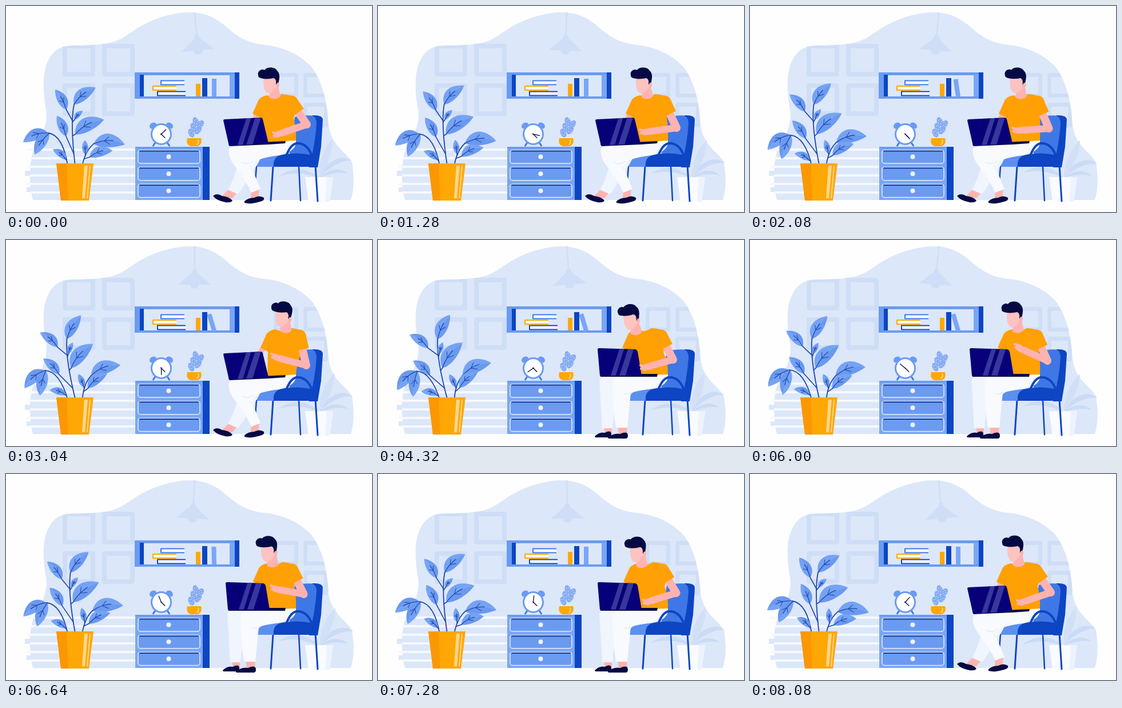
An HTML page with a canvas for the animation above (8.16 s loop, 640 by 360 pixels).

```html
<!DOCTYPE html>
<html lang="en">
<head>
<meta charset="utf-8">
<title>Working from home</title>
<style>
html, body { margin: 0; width: 100%; height: 100%; overflow: hidden; background: #fefefe; }
canvas { display: block; width: 640px; height: 360px; }
</style>
</head>
<body>
<canvas id="stage" width="640" height="360"></canvas>
<script>
const g = document.getElementById('stage').getContext('2d');
const LOOP = 8160, STEP = 80, TAU = Math.PI * 2;
const C = {
  paper: '#fefefe', wall: '#dce7f9', frame: '#cfdef6', faint: '#cbdbf5',
  sky: '#7aa6f5', blue: '#6a9bf1', mid: '#3f78e6', deep: '#0d45c2', ink: '#1e46ad',
  navy: '#060a42', laptop: '#080078', orange: '#ffa704', shirt: '#ffa004', amber: '#fb9703',
  face: '#fcc3c1', skin: '#ffb3b0', pants: '#f8fafe', crease: '#dfe8f8'
};

const fill = (d, color) => { g.fillStyle = color; g.fill(new Path2D(d)); };
const line = (d, color, w = 1.5, cap = 'round') => {
  g.strokeStyle = color; g.lineWidth = w; g.lineCap = cap; g.lineJoin = 'round';
  g.stroke(new Path2D(d));
};
const box = (x, y, w, h, color) => { g.fillStyle = color; g.fillRect(x, y, w, h); };
const oval = (x, y, rx, ry, color, turn = 0) => {
  g.fillStyle = color; g.beginPath(); g.ellipse(x, y, rx, ry, turn, 0, TAU); g.fill();
};
const at = (x, y, turn, draw) => {
  g.save(); g.translate(x, y); g.rotate(turn); draw(); g.restore();
};
const mix = (a, b, k) => a + (b - a) * k;

// Eased 0 to 1 between a and b; pulse rises over a..b and falls over c..d.
const ramp = (t, a, b) => (1 - Math.cos(Math.PI * Math.min(1, Math.max(0, (t - a) / (b - a))))) / 2;
const pulse = (t, a, b, c, d) => ramp(t, a, b) - ramp(t, c, d);
const swing = t => Math.cos(2 * TAU * t / LOOP);

const BLOB = 'M47 339H603C609 320 609 300 605 273C594 254 572 246 565 214C562 190 562 148 537 110' +
  'C516 84 480 70 452 68C420 65 400 50 380 32C356 13 336 11 318 11C290 12 255 22 226 41' +
  'C205 56 190 65 170 66C145 70 125 68 105 70C85 74 76 88 70 105C63 125 66 160 70 180' +
  'C74 205 62 230 50 247C40 270 40 310 47 339Z';

function pictures(x, y, size, rim, gap) {
  g.strokeStyle = C.frame; g.lineWidth = rim;
  for (const dx of [0, gap]) for (const dy of [0, gap])
    g.strokeRect(x + dx + rim / 2, y + dy + rim / 2, size - rim, size - rim);
}

function room() {
  box(0, 0, 640, 360, C.paper);
  fill(BLOB, C.wall);
  g.save();
  g.clip(new Path2D(BLOB));
  pictures(99, 66, 57, 8, 69);
  pictures(468, 117, 43, 7, 52);
  g.restore();
  box(33, 288, 100, 9, C.wall);
  box(36, 317, 100, 8, C.wall);
  for (let i = 0; i < 6; i++) {
    const x = 36 + i % 2 * 6;
    box(x, 249 + 15 * i, 226 - x, 4, '#f5f9ff');
  }
}

function lamp(t) {
  at(330, 11, -swing(t) * 0.088, () => {
    line('M0 0V42', C.frame, 2.5, 'butt');
    oval(0, 67, 8, 7, C.frame);
    fill('M-3 40H3L5 46L29 67H-29L-5 46Z', C.frame);
  });
}

function shelf(t) {
  box(225, 116, 183, 46, C.blue);
  box(241, 121, 150, 37, C.wall);
  box(234, 120, 7, 38, C.deep);
  box(391, 120, 9, 38, C.sky);
  box(400, 116, 8, 46, C.deep);
  [C.mid, C.orange, C.deep].forEach((color, i) => {
    const x = [270, 256, 264][i], y = 129.5 + i * 9.5, end = [312, 298, 314][i];
    box(x, y, end - x, 9, '#fff');
    line(`M${end} ${y + 1}H${x + 1}V${y + 8}H${end}`, color, 2, 'butt');
  });
  box(332, 136, 8, 22, C.orange);
  box(343, 126, 9, 32, C.deep);
  at(368, 158, -0.29 * pulse(t, 1840, 2320, 6240, 6720), () => box(-8, -31, 8, 31, C.sky));
}

function dresser() {
  box(226, 246, 120, 93, C.sky);
  box(226, 246, 130, 3, C.blue);
  box(344, 246, 12, 93, C.deep);
  for (let y = 252; y < 320; y += 29.7) {
    g.beginPath();
    g.roundRect(231, y, 108, 23, 4);
    g.fillStyle = C.blue; g.fill();
    g.strokeStyle = '#e3ecfd'; g.lineWidth = 1.5; g.stroke();
    line(`M234 ${y + 1.5}H336`, '#143a99', 2);
    oval(284.5, y + 11.5, 4, 4, '#f1f5fd');
  }
}

function clock(t) {
  const hand = (turn, size) => at(0, 0, turn, () => line(`M0 1V${-size}`, C.navy, 1.3));
  at(271.5, 224, 0, () => {
    line('M-10 14L-14 20M10 14L14 20', C.mid, 3);
    for (const s of [-1, 1]) oval(s * 14.5, -15, 6.5, 5, C.blue, s * 0.65);
    oval(0, 0, 18.5, 19, C.blue);
    oval(0, 0, 15.5, 16, '#fff');
    hand(2.35, 9);
    hand(TAU * (t / LOOP + 0.125), 11.5);
  });
}

function cactus() {
  for (let i = 0; i < 5; i++) {
    const x = 324 + i % 2 * 10 + i * 2, y = 222 - i * 5;
    oval(x, y, 5, 8, '#86abf3', i % 2 - 0.4);
    for (let a = 0; a < 5; a++)
      oval(x + 3 * Math.cos(a * TAU / 5), y + 4 * Math.sin(a * TAU / 5), 0.8, 0.8, C.wall);
  }
  fill('M317 231H341Q344 242 335 245H323Q314 242 317 231Z', C.orange);
  line('M336 234Q338 239 334 242', '#ffe4ae', 1.5);
}

// Each leaf: place along its stem, angle in degrees, stalk length, blade length.
const STEMS = [
  { curve: [121, 280, 112, 205, 119, 172],
    leaves: [[1, -38, 0, 48], [0.65, -119, 22, 40], [0.62, -48, 6, 21], [0.4, -27, 5, 57], [0.15, -114, 34, 39]] },
  { curve: [108, 280, 100, 226, 74, 222],
    leaves: [[1, 160, 0, 47], [0.97, 124, 0, 45], [0.1, -142, 2, 29]] },
  { curve: [133, 280, 140, 245, 164, 234],
    leaves: [[0.75, 1, 0, 55], [0.3, -92, 2, 25], [0.2, -16, 10, 42]] }
];

// The blade arches up and its tip droops the more it lies flat.
function leaf(angle, stalk, n) {
  const w = n * 0.28, arch = -Math.cos(angle) * n * 0.16;
  const edge = s => `C${n * 0.2} ${arch + s * w} ${n * 0.65} ${arch + s * w * 1.05} ${n} 0`;
  const rib = `M0 0Q${n * 0.5} ${arch * 1.5} ${n} 0`;
  line(`M0 0H${stalk}`, C.ink, 1.6);
  g.translate(stalk, 0);
  fill('M0 0' + edge(-1) + `Q${n * 0.5} ${arch * 1.5} 0 0Z`, '#75a3f4');
  fill('M0 0' + edge(1) + `Q${n * 0.5} ${arch * 1.5} 0 0Z`, '#6a99ef');
  g.save();
  g.beginPath(); g.rect(-1, -n, n * 0.65, 2 * n); g.clip();
  line(rib, C.ink, 1.3);
  g.restore();
  const y = arch * 0.66;
  line(`M${n * 0.48} ${y - w * 0.45}L${n * 0.34} ${y}L${n * 0.52} ${y + w * 0.4}`, C.ink, 1);
}

function plant(t) {
  const lean = pulse(t, 0, 4100, 4800, LOOP);
  at(121, 275, -0.145 * lean, () => {
    g.translate(-121, -275);
    for (const { curve: [ax, ay, bx, by, cx, cy], leaves } of STEMS) {
      const along = (a, b, c, u) => mix(mix(a, b, u), mix(b, c, u), u);
      line(`M${ax} ${ay}Q${bx} ${by} ${cx} ${cy}`, C.ink, 1.8);
      for (const [u, deg, stalk, size] of leaves) {
        const angle = deg * TAU / 360 - 0.29 * lean;
        at(along(ax, bx, cx, u), along(ay, by, cy, u), angle, () => leaf(angle, stalk, size));
      }
    }
  });
  fill('M88 275H153L145 340H96Z', C.orange);
  fill('M88 275H106L109 340H96Z', C.amber);
  fill('M137 279H143L138 336H133Z', '#ffd78e');
  fill('M146 279H148L143 336H141Z', '#ffd78e');
}

function basket(t) {
  at(548, 301, -0.05 * swing(t), () => {
    fill('M0 0C8 -24 38 -44 58 -28C42 -30 16 -18 0 0Z', C.faint);
    fill('M0 0C0 -30 10 -52 26 -68C26 -44 16 -20 0 0Z', '#d2e0f7');
    fill('M0 0C16 -16 36 -18 50 -6C32 -10 14 -6 0 0Z', C.faint);
    fill('M0 0C-20 -22 -50 -22 -72 -6C-46 -14 -22 -10 0 0Z', C.faint);
  });
  fill('M523 299H572L566 342H529Z', '#f9fbff');
  fill('M561 299H572L566 342H558Z', '#edf3fd');
}

function chair() {
  line('M438 280L436 306M512 280L515 340', C.deep, 2.5);
  line('M467 280L463 340M541 278L545 341', C.deep, 3);
  fill('M505 194Q530 189 546 193L539 262H495Z', C.mid);
  fill('M535 191Q554 190 554 199L551 246L545 282H530Q541 240 543 205Q543 194 535 191Z', C.deep);
  fill('M439 281Q438 268 452 264L490 258V281Z', '#5c90ef');
  fill('M468 281Q466 262 484 260Q508 255 532 260Q540 262 538 281Z', C.deep);
}

function legsCrossed() {
  fill('M390 320L404 326L396 336L376 334Z', C.skin);
  fill('M429 318L443 320L441 336L428 337Z', C.skin);
  fill('M362 332Q368 326 378 332Q390 333 396 340Q394 344 384 343Q368 340 362 332Z', C.navy);
  fill('M417 341Q424 335 434 335Q443 330 451 335Q453 340 444 342Q428 347 417 344Z', C.navy);
  fill('M408 262L447 263Q432 292 406 329L388 321Q402 298 408 262Z', '#f0f5fe');
  fill('M390 249Q396 241 420 241L507 235Q509 254 478 261Q458 263 440 269Q430 274 431 286L445 320L429 326' +
    'Q418 302 401 281Q387 263 390 249Z', C.pants);
  line('M432 272Q422 278 413 273M431 286L427 281', C.crease, 1.2);
}

function legsDown() {
  fill('M395 324H409V340H397Z', C.skin);
  fill('M419 324H436L435 341H421Z', C.skin);
  for (const [x, y, w] of [[379, 345, 29], [402, 347, 35]])
    fill(`M${x} ${y - 2}Q${x + w * 0.3} ${y - 10} ${x + w * 0.6} ${y - 8}Q${x + w} ${y - 14} ${x + w} ${y - 5}` +
      `Q${x + w} ${y} ${x + w - 4} ${y}H${x + 3}Q${x} ${y} ${x} ${y - 2}Z`, C.navy);
  fill('M387 244Q390 237 404 237H440L416 270L410 329H392Z', '#f0f5fe');
  fill('M410 246Q418 238 440 237L507 235Q509 254 480 260Q458 262 442 267L436 328H416Q410 290 410 246Z', C.pants);
  line('M441 267Q434 271 430 268', C.crease, 1.2);
}

function laptop(down) {
  const screen = down
    ? 'M384 191Q384 189 387 189L450 191Q453 192 454 195L461 237H388Z'
    : 'M380 200Q380 198 383 198L446 195Q448 195 449 198L459 240L390 244Z';
  fill(down ? 'M388 234H489L488 239L461 239H389Z' : 'M389 241L489 236L488 240L459 242L391 245Z', C.navy);
  fill(screen, C.laptop);
  g.save();
  g.clip(new Path2D(screen));
  fill('M423 188H431L413 246H404Z', '#37379c');
  fill('M438 188H448L430 246H419Z', '#37379c');
  g.restore();
}

function head(x, y, turn) {
  at(467 + x, 150 + y, turn, () => {
    g.translate(-467, -150);
    fill('M461 146L475 136L480 158Q471 166 460 160Z', C.skin);
    fill('M451 122C449 135 450 146 455 151Q462 155 467 149L474 140L472 122Z', C.face);
    fill('M441 121C439 114 447 109 452 112C456 106 470 106 474 113C480 118 478 127 477 132L475 142L472 136' +
      'C473 130 471 127 468 126C460 128 448 128 443 125Q441 124 441 121Z', C.navy);
    oval(475.5, 138, 2.6, 4, C.skin);
  });
}

// Head x, y, turn; shoulders; elbow x, y; hand x, y. The others add to REST.
const REST = [0, 0, 0, 0, 526, 207, 470, 226];
const TYPE = [1, 0, 0, 2, -4, 6, -9, -5];
const BACK = [20, 0, 0.1, 14, -1, 12, -3, -22];
const FORWARD = [-19, 4, -0.09, -4, -10, 2, -8, -2];
const RAISE = [-1, 0, 0, 2, -6, 4, -4, -39];

function pose(t) {
  const moves = [
    [TYPE, pulse(t, 0, 1280, 1840, 2720)],
    [BACK, pulse(t, 1840, 2720, 3120, 3760)],
    [FORWARD, pulse(t, 3120, 3840, 4720, 5760) + 0.45 * pulse(t, 6320, 7120, 7440, 8080)],
    [RAISE, pulse(t, 4720, 5760, 6320, 7120)]
  ];
  return REST.map((v, i) => moves.reduce((sum, [move, k]) => sum + move[i] * k, v));
}

function arm(s, ex, ey, hx, hy) {
  const sx = 499 + s, sy = 168;
  const cx = mix(sx, ex, 0.46), cy = mix(sy, ey, 0.46);
  line(`M${cx} ${cy}L${ex} ${ey}`, C.skin, 14);
  line(`M${ex} ${ey}L${mix(ex, hx, 0.78)} ${mix(ey, hy, 0.78)}`, C.skin, 12);
  oval(mix(ex, hx, 0.88), mix(ey, hy, 0.88), 9, 5.5, C.skin, Math.atan2(hy - ey, hx - ex));
  line(`M${hx + 7} ${hy - 2}L${hx - 3} ${hy - 5}M${hx + 6} ${hy + 2}L${hx - 2} ${hy + 1}`, C.skin, 4);
  line(`M${sx} ${sy}L${cx} ${cy}`, C.shirt, 23, 'butt');
  oval(sx, sy, 11.5, 11.5, C.shirt);
}

function torso(s) {
  line(`M${440 + s} 182L${436 + s / 2} 200L450 220`, C.skin, 10);
  fill(`M${457 + s} 156Q${443 + s} 158 ${440 + s} 168L${431 + s} 188L${444 + s} 195L457 238L507 236` +
    `Q508 215 ${503 + s} 196L${511 + s} 168Q${506 + s} 155 ${482 + s} 154Q${469 + s} 163 ${457 + s} 156Z`, C.shirt);
  line(`M${446 + s} 180L${445 + s} 195`, C.amber, 1.2);
}

function man(t) {
  const down = t >= 3360 && t < 8000;
  const [hx, hy, turn, s, ...reach] = pose(t);
  torso(s);
  head(hx, hy, turn);
  (down ? legsDown : legsCrossed)();
  line('M490 262Q498 240 510 240Q527 240 535 262', C.deep, 4);
  laptop(down);
  arm(s, ...reach);
}

function draw(t) {
  room();
  lamp(t);
  shelf(t);
  dresser();
  clock(t);
  cactus();
  plant(t);
  basket(t);
  chair();
  man(t);
}

const start = performance.now();
function tick() {
  const t = Math.max(0, performance.now() - start) % LOOP;
  draw(Math.floor(t / STEP) * STEP);
  requestAnimationFrame(tick);
}
tick();
</script>
</body>
</html>
```
